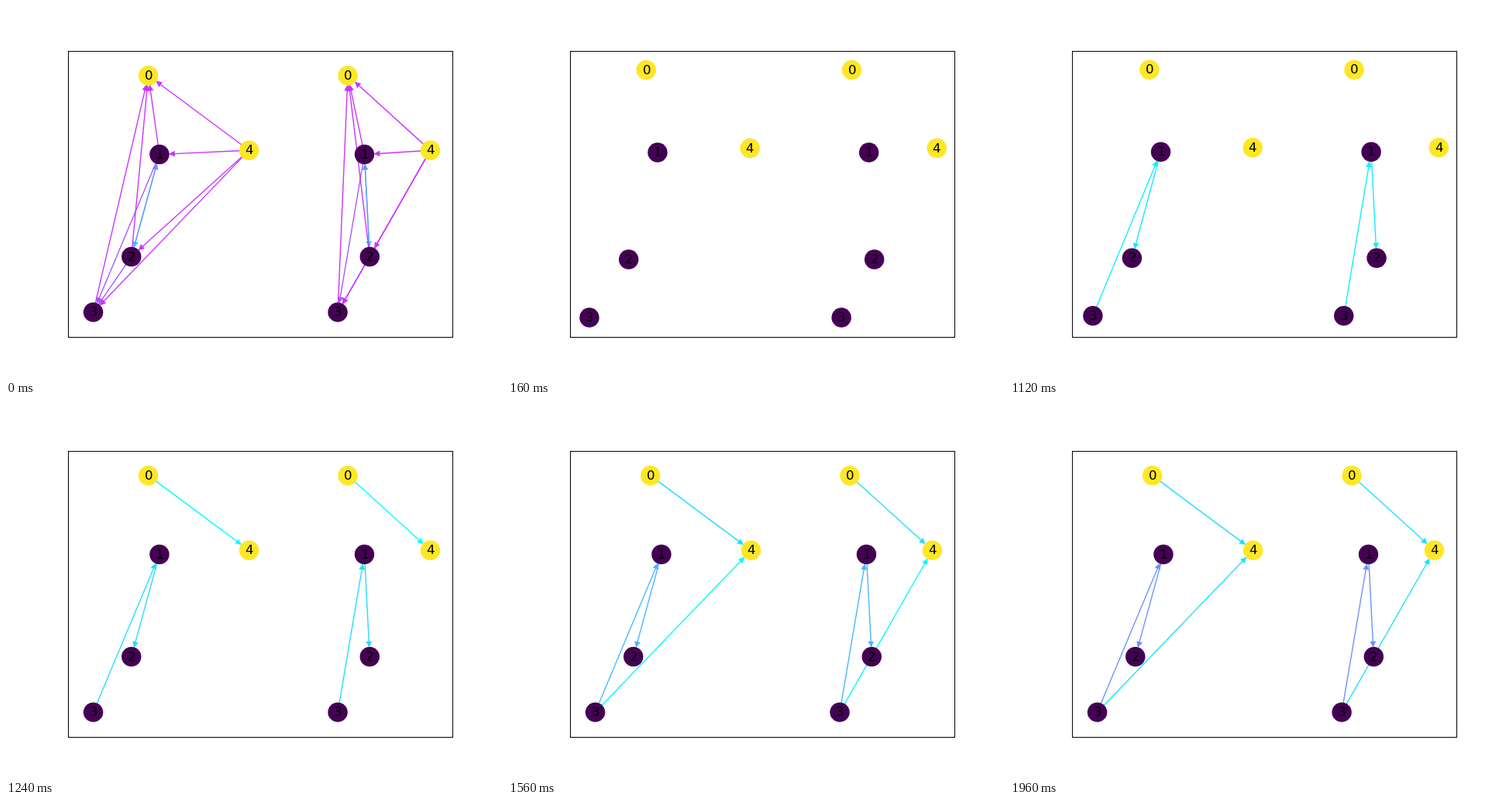
Write an HTML page with a canvas that moves like this. It is 640x480 px and loops after 2040 ms.

```html
<!DOCTYPE html>
<html lang="en">
<head>
<meta charset="utf-8">
<title>Two views of a changing graph</title>
<style>
  html, body { margin: 0; width: 100%; height: 100%; overflow: hidden; background: #fff; }
  canvas { display: block; width: 640px; height: 480px; }
</style>
</head>
<body>
<canvas id="stage" width="640" height="480"></canvas>
<script>
const ctx = document.getElementById('stage').getContext('2d');
const LOOP = 2040, STEP = 40, LAST = 1960, OPENING = 160;
const PT = 100 / 72;
const RADIUS = Math.sqrt(300) / 2 * PT;
const AXES = { x: 80, y: 57.6, w: 496, h: 369.6 };
const YELLOW = '#fde725', PURPLE = '#440154';

// Both graphs share their heights; places hold while no edge widens the limits
const HEIGHTS = [82.4, 189, 327, 402, 183.4];
const GRAPHS = [
  [178.3, 193, 155.7, 105, 312.2],
  [443.6, 465.7, 472.7, 430.2, 553.3]
].map(xs => xs.map((x, i) => [x, HEIGHTS[i]]));

// Edges of the opening state, grouped by strength
const STRENGTHS = { '12': 0.15, '21': 0.43, '13 23': 0.65, '10 20 30 40 41 42 43': 0.8 };

// Edges that grow later: their weight follows a sine arch from the start on
const GROWTH = [
  { pair: '04', start: 960, end: 1040, peak: 0.16, span: 1000 },
  { pair: '04', start: 1240, peak: 0.16, span: 1000 },
  { pair: '12', start: 960, peak: 0.5, span: 3000 },
  { pair: '31', start: 1000, peak: 0.5, span: 3000 },
  { pair: '34', start: 1520, peak: 0.12, span: 700 }
];

const edge = (pair, w) => ({ from: +pair[0], to: +pair[1], w });

function edgesAt(t) {
  if (t < OPENING) {
    return Object.entries(STRENGTHS).flatMap(([pairs, w]) =>
      pairs.split(' ').map(pair => edge(pair, w + t / 2500)));
  }
  return GROWTH
    .filter(({ start, end = LOOP }) => t >= start && t < end)
    .map(({ pair, start, peak, span }) =>
      edge(pair, peak * Math.sin(Math.PI * (t - start) / span)));
}

function coolColor(w) {
  const v = Math.round(w * 255);
  return `rgb(${v},${255 - v},255)`;
}

// Axis scaling: edge boxes padded by 5 %, then a 5 % margin around everything
function axisMap(dim, start, size, edges) {
  const margin = size / 22;
  let lo = start + margin, hi = start + size - margin;
  for (const nodes of GRAPHS) {
    if (!edges.length) break;
    const ends = edges.flatMap(e => [nodes[e.from][dim], nodes[e.to][dim]]);
    const min = Math.min(...ends), max = Math.max(...ends);
    const pad = (max - min) * 0.05;
    lo = Math.min(lo, min - pad);
    hi = Math.max(hi, max + pad);
  }
  const scale = (size - 2 * margin) / (hi - lo);
  return v => start + margin + (v - lo) * scale;
}

function drawArrow([x0, y0], [x1, y1], color) {
  const tip = Math.hypot(x1 - x0, y1 - y0) - RADIUS - 1.118 * PT;
  const head = 4 * PT;
  ctx.save();
  ctx.translate(x0, y0);
  ctx.rotate(Math.atan2(y1 - y0, x1 - x0));
  ctx.strokeStyle = ctx.fillStyle = color;
  ctx.lineWidth = PT;
  ctx.beginPath();
  ctx.moveTo(RADIUS, 0);
  ctx.lineTo(tip, 0);
  ctx.stroke();
  ctx.beginPath();
  ctx.moveTo(tip - head, -head / 2);
  ctx.lineTo(tip, 0);
  ctx.lineTo(tip - head, head / 2);
  ctx.closePath();
  ctx.fill();
  ctx.stroke();
  ctx.restore();
}

function drawNode([x, y], color) {
  ctx.fillStyle = color;
  ctx.beginPath();
  ctx.arc(x, y, RADIUS + PT / 2, 0, Math.PI * 2);
  ctx.fill();
}

// Labels sit on whole pixels
function drawLabel([x, y], text) {
  ctx.fillStyle = '#000';
  ctx.font = `${12 * PT}px "DejaVu Sans", sans-serif`;
  ctx.fillText(text, Math.round(x - 4.8), Math.round(y + 5.15));
}

function draw(time) {
  const t = Math.min(LAST, Math.floor((time % LOOP) / STEP) * STEP);
  const edges = edgesAt(t);
  const mapX = axisMap(0, AXES.x, AXES.w, edges);
  const mapY = axisMap(1, AXES.y, AXES.h, edges);

  ctx.fillStyle = '#fff';
  ctx.fillRect(0, 0, 640, 480);
  for (const graph of GRAPHS) {
    const nodes = graph.map(([x, y]) => [mapX(x), mapY(y)]);
    for (const e of edges) drawArrow(nodes[e.from], nodes[e.to], coolColor(e.w));
    nodes.forEach((p, i) => {
      drawNode(p, i % 4 ? PURPLE : YELLOW);
      drawLabel(p, String(i));
    });
  }
  ctx.strokeStyle = '#000';
  ctx.lineWidth = 1;
  ctx.strokeRect(80.5, 58.5, 496, 369);
}

const start = performance.now();
function tick() {
  draw(performance.now() - start);
  requestAnimationFrame(tick);
}
tick();
</script>
</body>
</html>
```
